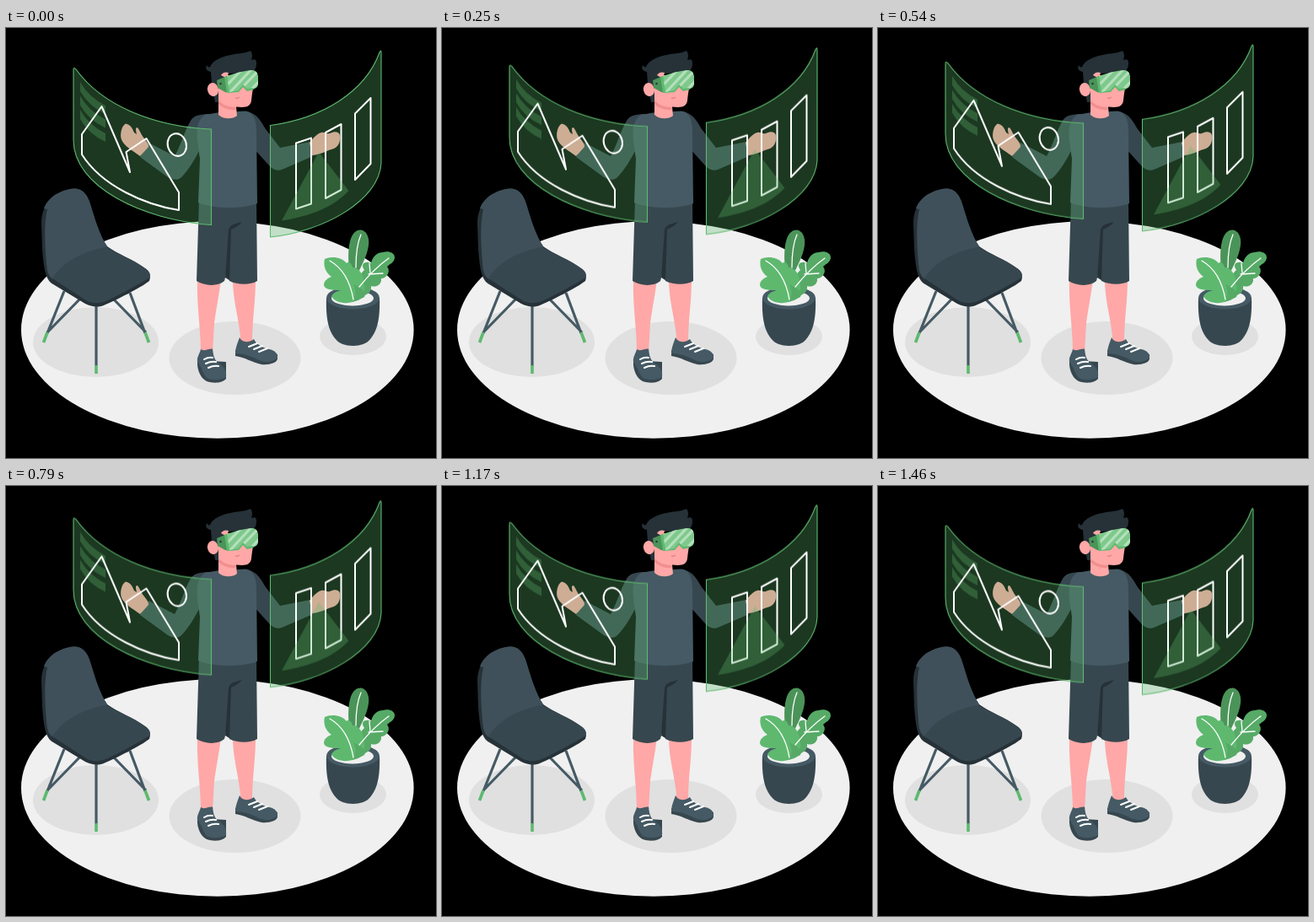
These frames come from a looping animation (510 px wide and 510 px high, 1500 ms). An HTML page without scripts:

```html
<!DOCTYPE html>
<html lang="en">
<head>
<meta charset="utf-8">
<title>Virtual screens</title>
<style>
  html, body { margin: 0; width: 100%; height: 100%; overflow: hidden; background: #000; }
  svg { display: block; width: 100vw; height: 100vh; }
  .floor { fill: #f0f0f0; }
  .shade { fill: #e0e0e0; }
  .ink { fill: #263238; }
  .dark { fill: #37474f; }
  .slate { fill: #455a64; }
  .back { fill: #3f505a; }
  .skin { fill: #ffa8a7; }
  .blush { fill: #f28f8f; }
  .green { fill: #5eb96f; }
  .leaf { fill: #56aa66; }
  .moss { fill: #4b9459; }
  .line { fill: none; stroke: #fff; stroke-linecap: round; stroke-linejoin: round; }
  .leg { fill: none; stroke: #455a64; stroke-width: 3.2; }
  .tip { fill: none; stroke: #5eb96f; stroke-width: 3.6; }
  .pane { fill: #5eb96f; fill-opacity: .3; stroke: #5eb96f; stroke-width: 1.1; }
  .tint { fill: #5eb96f; fill-opacity: .3; }
  .screens { animation: float 1.5s linear infinite; }
  @keyframes float { 50% { transform: translateY(-10px); } }
</style>
</head>
<body>
<svg viewBox="0 0 510 510">
  <defs>
    <path id="band" d="M88 64Q98 82 118 92V102Q98 93 88 75Z"/>
    <clipPath id="visor"><path d="M262 57Q278 51 293 50Q298 51 299 57V67Q298 72 293 72L286 73L281 68L275 75L264 77Z"/></clipPath>
  </defs>

  <ellipse class="floor" cx="250.800" cy="358" rx="232.800" ry="128.800"/>
  <g class="shade">
    <ellipse cx="106.500" cy="372.500" rx="74.500" ry="41.500"/>
    <ellipse cx="271.500" cy="391.500" rx="78" ry="43.500"/>
    <ellipse cx="411.500" cy="366" rx="39.500" ry="22"/>
  </g>

  <g id="chair">
    <path class="leg" d="M69 312L49 362M88 321L49 361M107 328V401M147 314L165 362M128 322L166 361"/>
    <path class="tip" d="M49 361L44.500 373M107 400V410M165 361L169.500 373"/>
    <path class="ink" d="M42 232C42 206 60 193 80 190.500C93 190 98 201 101 212C105 225 111 246 120 259C132 268 152 275 165 285C171 289 172 295 170 300C160 308 130 323 118 328C110 332 102 331 94 327L56 304C47 299 45 287 43 262Z"/>
    <path class="back" d="M45 214C50 200 65 192 80 190.500C93 190 98 201 101 212C105 225 111 246 120 259L112 275L56 298C50 294 49 290 48 278C46 255 45 232 49 215Z"/>
    <path class="dark" d="M55 297C68 277 92 264 119 260C132 268 152 275 165 285C171 289 172 293 170 296C160 303 130 319 118 324C110 327 102 327 95 323Z"/>
  </g>

  <g id="plant">
    <path class="dark" d="M380 320C379 345 383 360 391 369C398 379.500 425 379.500 432 369C440 360 444 345 443 320Z"/>
    <ellipse class="slate" cx="411.500" cy="320" rx="31.500" ry="13.500"/>
    <ellipse class="floor" cx="411" cy="320.500" rx="25" ry="9"/>
    <path class="moss" d="M408 290C405 275 405 249 414 242C423 235 432 244 430 258C428 272 421 282 417 292Z"/>
    <path class="leaf" d="M414 320C416 303 418 293 425 287C419 279 428 276 433 279C435 270 441 266 447 266C453 264 461 266 461 272C461 278 455 280 452 283C457 289 451 297 445 297C446 305 438 308 433 306C434 312 429 317 422 318Z"/>
    <path class="green" d="M411 325C401 328 389 325 386 318C389 313 395 311 399 311C389 311 378 311 377 305C377 299 383 296 386 295C379 290 376 282 378 274C386 270 399 272 404 279C406 276 410 279 411 284C419 284 425 294 424 302C428 309 423 319 411 325Z"/>
    <path class="leaf" d="M411 325C416 318 415 311 412 304C421 309 429 313 425 319Q419 323 411 325Z"/>
    <path class="line" stroke-width="1.300" d="M415 284C415 267 417 254 421 245M384 276C398 284 408 299 412 322M419 307C427 297 437 285 454 273M432 291L431 279M430 292L447 291"/>
  </g>

  <g id="man">
    <path class="skin" d="M227 298H255C253 315 249 335 247 350L245 386H231C231 355 226 330 227 298ZM269 298H296C296 325 292 345 292 372L279 376C277 345 269 325 269 298Z"/>
    <g id="shoes">
      <path class="dark" d="M227 394C226 407 232 416 238 419C247 422 257 421 261 416V396ZM272 382V389C282 390 293 397 303 399C312 400 322 397 322 392V387Z"/>
      <path class="slate" d="M231 381C235 384 240 380 245 380.500C246 389 247 394 253 398C259 402 262 407 261 414C255 418 243 418 238 415C233 409 232 402 227 396C226 390 230 386 231 381ZM277 367C280 373 287 374 294 369C297 375 304 379 312 381C319 382 323 387 322 391C315 398 305 397 296 392C288 388 280 386 272 386C272 379 275 373 277 367Z"/>
      <path class="line" stroke-width="2" d="M235 393Q240 390 245 391M237 398Q243 395 249 396M240 403Q246 400 252 401M288 378L298 374M294 381L304 377M300 384L310 380"/>
    </g>
    <path class="dark" d="M229 203H297L298 300C290 305 275 305 265 300L262 288L259 300C251 307 235 306 226 300Z"/>
    <path class="ink" d="M280 230C272 232 266 233 264 239L260 296L265 299L267 239C272 237 277 234 280 230Z"/>
    <path class="dark" d="M169 136L200 152C208 138 212 121 219 110C222 104 230 102 242 102L232 140C224 156 215 171 207 178C203 181 198 180 192 177L159 153ZM286 99C299 102 303 112 308 120L325 142L361 135L364 152L327 168C320 170 316 167 312 163L294 143Z"/>
    <path class="slate" d="M236 103L253 100C259 104 268 104 274 99L284 98.500C293 100 297 108 297 122L298 208C281 215 245 215 228 207L230 155C228 136 221 113 236 103Z"/>
    <path class="skin" d="M159 152C150 145 139 140 136.500 131C135 124 138 115 142 113.500C147 114 150 119 152 124L155 126C154 121 153 118 156 118C159 122 160 126 164 131C167 135 169 137 169 141ZM360 136C365 130 369 125 374 124C378 123 380 126 384 125C390 122 395 123 396 127C397 134 395 140 389 143C380 145 375 150 363 151Z"/>
    <path class="skin" d="M252 56H297C293 67 292 78 291 86C290 93 285 95 273 93.500L274 104C268 109 257 108 252 103Z"/>
    <path class="blush" d="M252 86C258 92 265 94 273 94L272 97C263 98 256 94 252 90Z"/>
    <path class="ink" d="M248 88L244 66L243 52C238 51 236 48 238 44C239 46 241 47 242 46C245 38 258 33 271 31C280 30 286 29 290 27C293 31 292 35 291 38C295 36 297 38 297 41C297 47 296 50 291 52L264 54L256 62L252 70V88Z"/>
    <ellipse class="skin" cx="245.500" cy="73" rx="6.500" ry="8" transform="rotate(-15 245.500 73)"/>
    <path class="skin" d="M255 56Q258 51 264 53L262 60Z"/>
    <path class="moss" d="M250 62L262 57L266 77L260 76L251 71Z"/>
    <circle class="ink" cx="254.500" cy="66" r="1.200"/>
    <g clip-path="url(#visor)">
      <path fill="#7ec98b" d="M250 45H310V85H250Z"/>
      <path stroke="#b4dfbc" stroke-width="3.200" d="M258 72L280 49M265 77L292 48M272 79L299 51M290 74L303 60"/>
    </g>
    <path class="green" d="M262 57L265 76L275 74L281 67L286 72L293 71L294 73L286 75L281 70L276 76L262 77L259 58Z"/>
    <path fill="none" stroke="#d9706f" d="M272 83Q275 84 277 82"/>
  </g>

  <g class="screens">
    <path class="pane" d="M80 49Q80 46 83 49C114 92 175 117 243.500 120V233.500C162 228 80 188 80 133Z"/>
    <g class="tint">
      <use href="#band"/>
      <use href="#band" y="16.500"/>
      <use href="#band" y="33"/>
    </g>
    <g class="line" stroke-width="2">
      <path d="M90 126L113.500 93L147 171L142.500 147L166.500 131L205 195V216C166 210 114 188 90 150Z"/>
      <ellipse cx="202.800" cy="138.500" rx="11" ry="13.500" transform="rotate(-15 202.800 138.500)"/>
    </g>
    <path class="pane" d="M313.500 115.500C375 107 426 76 443 29Q445 25 445 29V160C443 205 375 242 313.500 248Z"/>
    <path class="line" stroke-width="2" d="M344 136.500L362 130.500V208.500L344 214.500ZM379 124L397.500 114V192L379 202ZM414 101.500L432.500 83V161L414 180Z"/>
    <path class="tint" d="M371 147L327 228.500C362 223 389 212 406.500 193Z"/>
  </g>
</svg>
</body>
</html>
```
